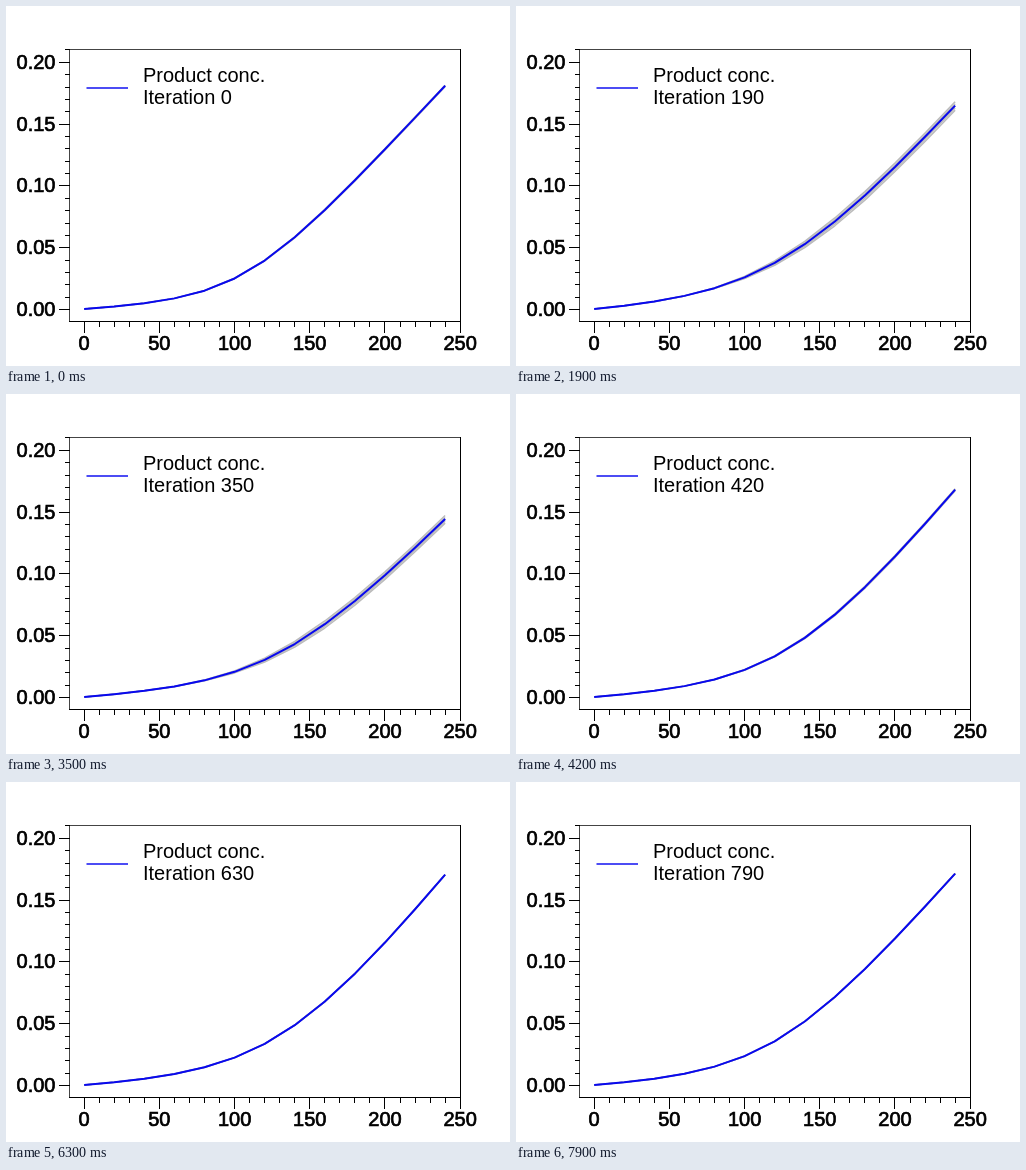
An HTML page for the animation above (8000 ms loop, 504 by 360 pixels).

```html
<!DOCTYPE html>
<html lang="en">
<head>
<meta charset="utf-8">
<title>Product concentration by iteration</title>
<style>
  html, body { margin: 0; width: 100%; height: 100%; overflow: hidden; background: #fff; }
  svg { display: block; width: 504px; height: 360px; }
  text { font: 20px "Liberation Sans", Arial, sans-serif; fill: #000; }
  .label { stroke: #000; stroke-width: .7; }
  .axis { fill: none; stroke: #000; stroke-width: 1; shape-rendering: crispEdges; }
  .far { stroke: #444; }
  .curve { fill: none; stroke-linejoin: round; }
</style>
</head>
<body>
<svg viewBox="0 0 504 360">
  <g id="axes"></g>
  <g id="curves"></g>
  <path d="M80.5 82H122" stroke="#1010f0" stroke-width="1.7"/>
  <text x="137" y="76">Product conc.</text>
  <text x="137" y="98" id="counter"></text>
</svg>
<script>
const LOOP = 8000, STEP = 100;
const axes = document.getElementById('axes');
const curves = document.getElementById('curves');
const counter = document.getElementById('counter');

const px = x => 78.18 + x * 1.504;
const py = y => 303.08 - y * 1.2365;   // y in thousandths

function add(parent, name, attrs, text = '') {
  const el = document.createElementNS('http://www.w3.org/2000/svg', name);
  for (const key in attrs) el.setAttribute(key, attrs[key]);
  el.textContent = text;
  return parent.appendChild(el);
}

function drawAxes() {
  let d = 'M63 315.5H454.5V43';
  for (let x = 0; x <= 250; x += 10) {
    const major = x % 50 === 0;
    d += `M${Math.floor(px(x)) + .5} 315.5v${major ? 11 : 5}`;
    if (major) add(axes, 'text', { class: 'label', x: px(x), y: 344, 'text-anchor': 'middle' }, x);
  }
  for (let y = 0; y <= 210; y += 10) {
    const major = y % 50 === 0;
    d += `M63.5 ${Math.round(py(y)) + .5}h${major ? -11 : -5}`;
    if (major) add(axes, 'text', { class: 'label', x: 49.5, y: py(y) + 7, 'text-anchor': 'end' }, (y / 1000).toFixed(2));
  }
  add(axes, 'path', { class: 'axis far', d: 'M63.5 315V43.5H454' });
  add(axes, 'path', { class: 'axis', d });
}

// The rate starts at `base` and changes by `gain` around sample `mid`, over about `width` samples.
const keys = [
  { time: 0,    base: 1.5, gain: 24.5, mid: 5.35, width: 1.28 },
  { time: 500,  base: 1.5, gain: 26,   mid: 5.3,  width: 1.3 },
  { time: 1000, base: 1.7, gain: 24.8, mid: 6.2,  width: 1.8 },
  { time: 2000, base: 1.7, gain: 24.8, mid: 6.2,  width: 1.8 },
  { time: 2900, base: 2.5, gain: -2.3, mid: 7.8,  width: .5 },
  { time: 3700, base: 1.5, gain: 27.4, mid: 6.6,  width: 1.7 },
  { time: 5200, base: 1.5, gain: 28,   mid: 6.6,  width: 1.7 },
  { time: 6300, base: 1.5, gain: 28,   mid: 6.6,  width: 1.7 },
  { time: 7900, base: 1.5, gain: 26,   mid: 6.12, width: 1.6 }
];

const samples = Array.from({ length: 13 }, (_, i) => i);
const candidates = Array.from({ length: 5 }, () =>
  add(curves, 'path', { class: 'curve', stroke: '#bbb', 'stroke-width': 1.5 }));
const best = add(curves, 'path', { class: 'curve', stroke: '#0808ee', 'stroke-width': 2 });

const mix = (a, b, u) => a + (b - a) * u;
const smooth = u => u * u * (3 - 2 * u);
const softplus = v => Math.log(1 + Math.exp(v));
const fan = i => smooth(Math.min(1, Math.max(0, (i - 3) / 6)));

function concentration(i, { base, gain, mid, width }) {
  return base * i + gain * width * (softplus((i - mid) / width) - softplus(-mid / width));
}

// Candidates scatter most at 2900 ms and converge faster afterwards.
function spreadAt(time) {
  const distance = (time - 2900) / (time < 2900 ? 2000 : 1000);
  return Math.exp(-distance * distance);
}

const toPath = values =>
  'M' + values.map((v, i) => px(i * 20).toFixed(2) + ' ' + py(v).toFixed(2)).join('L');

function render(time) {
  const next = Math.max(1, keys.findIndex(key => key.time >= time));
  const from = keys[next - 1], to = keys[next];
  const u = smooth((time - from.time) / (to.time - from.time));
  const values = samples.map(i => mix(concentration(i, from), concentration(i, to), u));
  const spread = spreadAt(time);

  best.setAttribute('d', toPath(values));
  candidates.forEach((path, n) =>
    path.setAttribute('d', toPath(values.map((v, i) => v + (4 - 2.2 * n) * spread * fan(i)))));
  counter.textContent = 'Iteration ' + time / 10;
}

const start = performance.now();
function tick() {
  const elapsed = (performance.now() - start) % LOOP;
  render(Math.floor(elapsed / STEP) * STEP);
  requestAnimationFrame(tick);
}

drawAxes();
tick();
</script>
</body>
</html>
```
